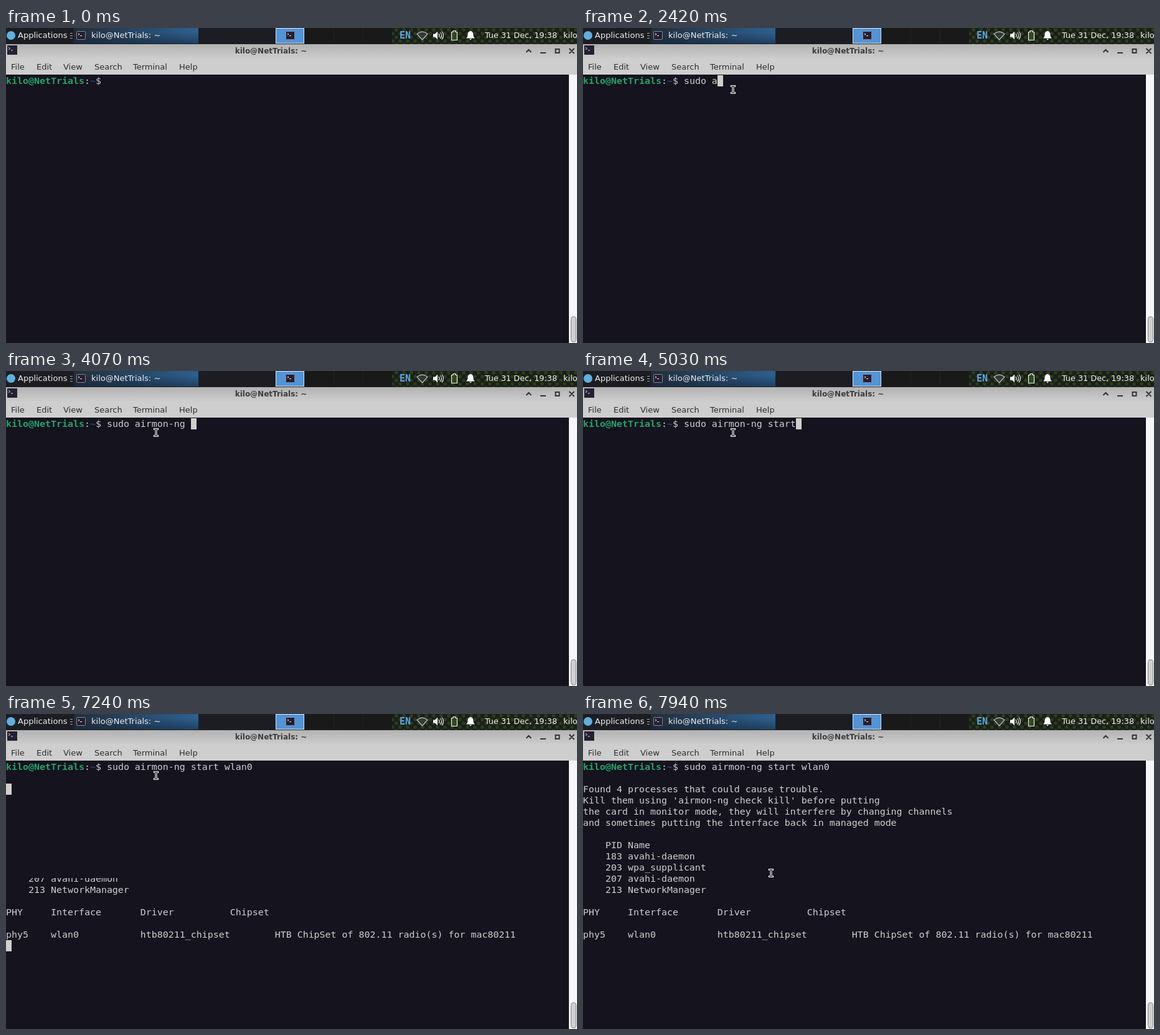
An HTML page for the animation above (8 s loop, 917 by 507 pixels).

```html
<!DOCTYPE html>
<html lang="en">
<head>
<meta charset="utf-8">
<title>Terminal</title>
<style>
  html, body { margin: 0; width: 100%; height: 100%; overflow: hidden; background: #15131e; }
  svg { display: block; width: 917px; height: 507px; }
  text { font: 13px "DejaVu Sans", sans-serif; white-space: pre; }
  .mono text { font: 14.95px "DejaVu Sans Mono", monospace; fill: #d0cfcc; }
  .mono .user { font-weight: bold; fill: #26a269; }
  .mono .dir { font-weight: bold; fill: #2c4566; }
  .panel text { fill: #eee; }
  .panel .lang { font: bold 15px "DejaVu Sans Mono", monospace; fill: #5aa5e6; }
  .panel .clock { font-size: 12.8px; }
  .menu text { fill: #2d2d2d; }
  .menu .title { font-size: 12px; font-weight: bold; fill: #3c3c3c; }
</style>
</head>
<body>
<svg viewBox="0 0 917 507">
  <defs>
    <linearGradient id="task">
      <stop offset="0" stop-color="#222e3b"/><stop offset="1" stop-color="#2d608f"/>
    </linearGradient>
    <linearGradient id="shade" x2="0" y2="1">
      <stop offset=".3" stop-color="#14243a" stop-opacity="0"/><stop offset="1" stop-color="#14243a" stop-opacity=".55"/>
    </linearGradient>
    <linearGradient id="bar" x2="0" y2="1">
      <stop offset="0" stop-color="#b2b2b2"/><stop offset="1" stop-color="#cecece"/>
    </linearGradient>
    <pattern id="dots" width="12" height="12" patternUnits="userSpaceOnUse">
      <circle cx="3" cy="3" r="2.8" fill="#2c4518"/><circle cx="9" cy="9" r="2.8" fill="#2c4518"/>
    </pattern>
    <clipPath id="lower"><path d="M0 264H917V507H0z"/></clipPath>
    <g id="app">
      <rect x=".5" y=".5" width="14" height="13" rx="1" fill="#241f31" stroke="#8a8795"/>
      <path d="M3 3.5l2 1.5-2 1.5M6 7.5h3" fill="none" stroke="#eee"/>
    </g>
  </defs>

  <g class="panel">
    <path d="M0 0H917V26H0z" fill="#1c1d22"/>
    <path d="M479 0H620V26H479z" fill="#191919"/>
    <path d="M526.5 0V25M573.5 0V25" stroke="#222"/>
    <path d="M620 0H917V26H620z" fill="#1b1e1a"/>
    <path d="M620 0H917V26H620z" fill="url(#dots)" opacity=".85"/>
    <circle cx="8" cy="12" r="7" fill="#5fb0dd"/>
    <text x="19" y="16">Applications</text>
    <path d="M103 8.5h4M103 12.5h4M103 16.5h4" stroke="#aaa"/>
    <path d="M109 0H309V25H109z" fill="url(#task)"/>
    <path d="M109 0H309V25H109z" fill="url(#shade)"/>
    <use href="#app" x="113" y="5"/>
    <text x="137" y="16">kilo@NetTrials: ~</text>
    <rect x="433.5" y=".5" width="45" height="24" fill="#5294d8" stroke="#d8e6f4"/>
    <use href="#app" x="449" y="5"/>
    <text class="lang" x="632" y="17">EN</text>
    <path d="M660 9.500Q668.500 2.500 677 9.500L668.500 19z" fill="#333a35" stroke="#b8bab6" stroke-width="1.300"/>
    <path d="M686 9.500h3l4-4v13l-4-4h-3z" fill="#fff"/>
    <path d="M695 9q2 3 0 6M697.500 7q4 5 0 10M700 5.500q5 6.500 0 13" fill="none" stroke="#eee" stroke-width="1.200"/>
    <path d="M715.500 6.500h2.500v-2h4v2h2.500v13h-9z" fill="#2f4a1c" stroke="#f0f0f0" stroke-width="1.200"/>
    <path d="M746 5c-4 0-4.500 4-4.500 7q0 2.500-2.500 4.500h14q-2.500-2-2.500-4.500c0-3-.5-7-4.500-7zM744 17.500h4l-2 2z" fill="#fff"/>
    <text class="clock" x="769" y="16">Tue 31 Dec, 19:38</text>
    <text x="895" y="16">kilo</text>
  </g>

  <g class="menu">
    <path d="M0 50H917V75H0z" fill="#cecece"/>
    <path d="M0 26H917V50H0z" fill="url(#bar)"/>
    <path d="M2 28h16v15H2z" fill="#241f31"/>
    <path d="M4 31l2.500 2-2.500 2M8 36h3" fill="none" stroke="#ddd"/>
    <text class="title" x="425.500" y="41" text-anchor="middle">kilo@NetTrials: ~</text>
    <path d="M835.500 39l4-4 4 4M858 40h9M882.500 34h6v6h-6zM904.500 33l8 8m0-8l-8 8" fill="none" stroke="#333" stroke-width="2"/>
    <text x="8" y="67">File</text>
    <text x="49" y="67">Edit</text>
    <text x="92" y="67">View</text>
    <text x="142" y="67">Search</text>
    <text x="204" y="67">Terminal</text>
    <text x="278" y="67">Help</text>
  </g>

  <path d="M0 75H904V507H0z" fill="#15131e"/>
  <path d="M904 75H917V507H904z" fill="#f6f6f6"/>
  <rect x="907.500" y="464.500" width="8" height="41" rx="4" fill="#d0d0d0" stroke="#858585"/>

  <g class="mono">
    <text y="90"><tspan class="user">kilo@NetTrials</tspan>:<tspan class="dir">~</tspan>$ <tspan id="typed"></tspan></text>
    <g id="output"></g>
  </g>
  <rect id="cursor" width="9" height="18" fill="#d0cfcc"/>
  <rect id="stale" y="112" width="9" height="18" fill="#d0cfcc"/>
  <g id="mouse" fill="none" stroke-linecap="square">
    <path id="beam" d="M-2.500-5.500h1.500l1 1 1-1h1.500M-2.500 5.500h1.500l1-1 1 1h1.500M0-4.500v9" stroke="#fff" stroke-width="3.200"/>
    <use href="#beam" style="stroke:#15131e"/>
    <path d="M-2.500-5.500h1.500l1 1 1-1h1.500M-2.500 5.500h1.500l1-1 1 1h1.500M0-4.500v9" stroke="#15131e" stroke-width="1.100"/>
  </g>
</svg>
<script>
const LOOP = 8000, CELL = 9, ROW = 18, TOP = 76, START = 18;
const $ = id => document.getElementById(id);
const command = "sudo airmon-ng start wlan0";

// One time per typed character
const keys = [
  1490, 1560, 1690, 1820, 2020,
  2420, 2490, 2750, 2880, 3480, 3610, 3740, 3880, 3880, 4070,
  4560, 4630, 4760, 4830, 5030, 5300,
  5500, 5630, 5770, 5970, 6440
];

// Pointer positions: time, x, y
const trail = [
  [70, 554, 326], [140, 470, 262], [200, 370, 190], [270, 295, 137], [340, 255, 108], [410, 241, 99],
  [7510, 246, 103], [7570, 262, 113], [7640, 284, 128], [7710, 300, 142], [7800, 308, 150],
  [7870, 306, 205], [7940, 302, 256]
];

const enter = 7040, partial = 7240, full = 7310;
const blinks = [[340, 890], [1420, 6840], [enter, 7780]];

const rows = [
  "Found 4 processes that could cause trouble.",
  "Kill them using 'airmon-ng check kill' before putting",
  "the card in monitor mode, they will interfere by changing channels",
  "and sometimes putting the interface back in managed mode",
  "",
  "    PID Name",
  "    183 avahi-daemon",
  "    203 wpa_supplicant",
  "    207 avahi-daemon",
  "    213 NetworkManager",
  "",
  "PHY     Interface       Driver          Chipset",
  "",
  "phy5    wlan0           htb80211_chipset        HTB ChipSet of 802.11 radio(s) for mac80211"
];

rows.forEach((line, i) => {
  const el = document.createElementNS("http://www.w3.org/2000/svg", "text");
  el.setAttribute("y", TOP + (i + 2) * ROW + 14);
  el.textContent = line;
  $("output").append(el);
});
$("beam").nextElementSibling.remove();

const show = (id, on) => $(id).setAttribute("visibility", on ? "visible" : "hidden");

function draw(t) {
  const count = keys.filter(k => k <= t).length;
  $("typed").textContent = command.slice(0, count);

  const row = t < enter ? 0 : t < 7110 ? 1 : t < partial ? 2 : 16;
  $("cursor").setAttribute("x", row ? 0 : (START + count) * CELL);
  $("cursor").setAttribute("y", TOP + row * ROW);
  show("cursor", blinks.some(([on, off]) => t >= on && t < off));

  const torn = t >= partial && t < full;
  show("output", t >= partial);
  show("stale", torn);
  $("output").setAttribute("clip-path", torn ? "url(#lower)" : "none");

  const at = trail.filter(p => p[0] <= t).pop();
  show("mouse", at);
  if (at) $("mouse").setAttribute("transform", `translate(${at[1]} ${at[2]})`);
}

const begin = performance.now();
function tick() {
  draw((performance.now() - begin) % LOOP);
  requestAnimationFrame(tick);
}
tick();
</script>
</body>
</html>
```
